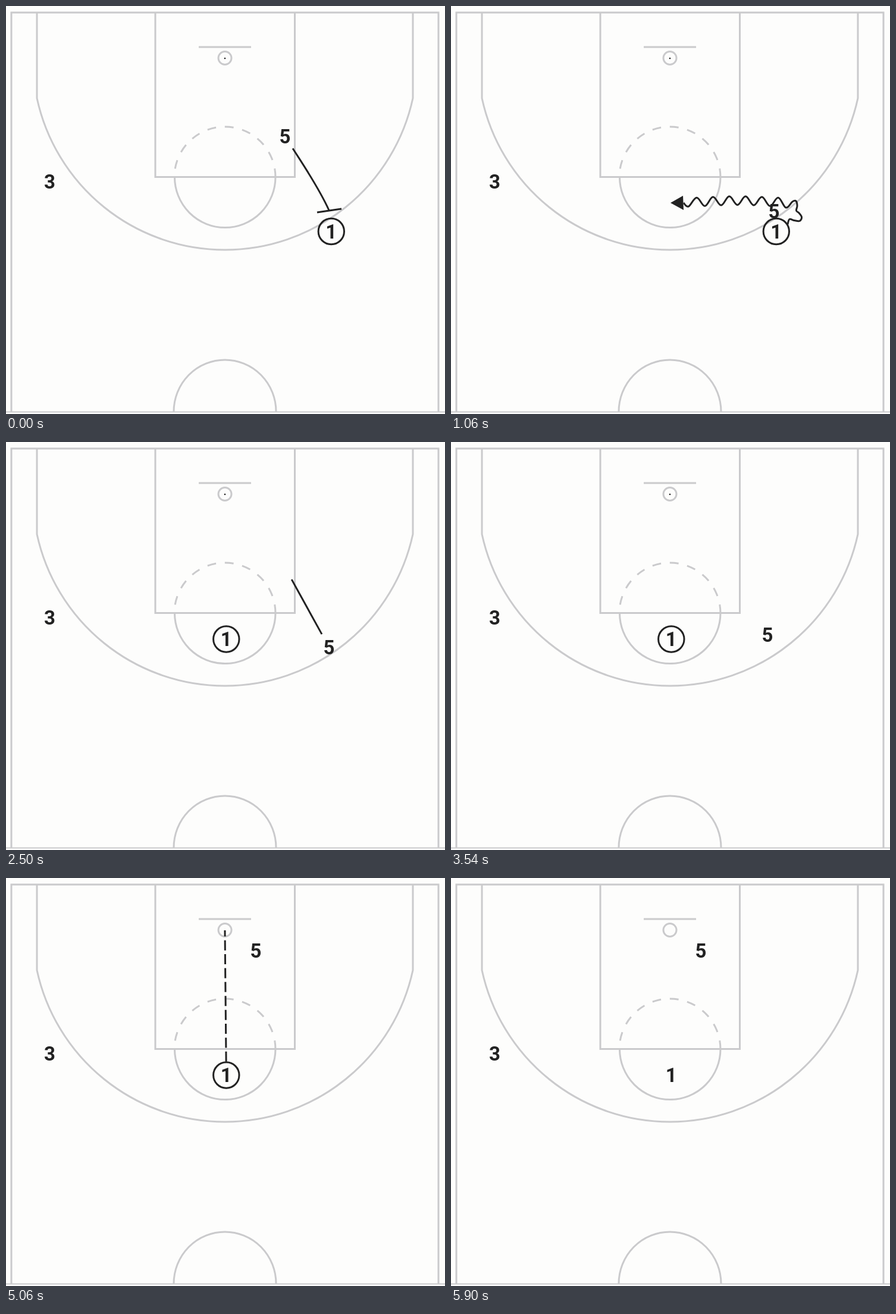
These frames come from a looping animation (738 px wide and 686 px high, 5.92 s). An HTML page:

```html
<!DOCTYPE html>
<html lang="en">
<head>
<meta charset="utf-8">
<title>Screen, dribble, cut, shot</title>
<style>
  html, body { margin: 0; width: 100%; height: 100%; overflow: hidden; background: #fdfdfc; }
  svg { display: block; width: 738px; height: 686px; }
  .court { fill: none; stroke: #cacacc; stroke-width: 3; }
  .ink { fill: none; stroke: #222; stroke-width: 3; }
  .solid { fill: #222; }
  text { font: 700 33px Roboto, Arial, sans-serif; text-anchor: middle; fill: #222; }
</style>
</head>
<body>
<svg viewBox="0 0 738 686">
  <g class="court">
    <path d="M9 682V11H727V682"/>
    <path d="M0 682.5H738" stroke-width="2"/>
    <path d="M52 11V155A323.3 323.3 0 0 0 684 155V11"/>
    <path d="M251 11V287.5H485.500V11"/>
    <path d="M283.500 287.500A84.700 85 0 0 0 453 287.500"/>
    <path d="M453 288A85 85 0 0 0 283 288" stroke-dasharray="14.830"/>
    <path d="M324 69H412"/>
    <circle cx="368" cy="87.5" r="11"/>
    <path d="M282 682A86 87 0 0 1 454 682"/>
  </g>
  <circle id="dot" class="solid" cx="368" cy="88" r="1.3"/>

  <g id="screen" class="ink">
    <path d="M482 239.500Q527 308 543 343.500M523 347L564 341"/>
  </g>
  <g id="dribble">
    <path id="wave" class="ink" pathLength="1"/>
    <path class="solid head" d="M369 331L390 319L391 343Z"/>
  </g>
  <g id="cut">
    <path id="cutLine" class="ink"/>
    <path class="solid head" d="M0 0L-22 -12V12Z" transform="translate(420 122) rotate(-118.900)"/>
  </g>
  <path id="shot" class="ink" stroke-dasharray="17 6.400"/>

  <path id="screenRoute" fill="none" d="M469 219Q518 290 543 345"/>
  <path id="dribbleRoute" fill="none" d="M546.800 379C563 366 582 358 582 345C582 329 560 329 536 328C480 326 430 326 370.300 331.500"/>

  <circle id="ball" class="ink" r="21.7"/>
  <text id="p1">1</text>
  <text id="p3">3</text>
  <text id="p5">5</text>
</svg>
<script>
const LOOP = 5920, MOVE = 320, DRAW = 235;
const moveAt = { screen: 20, dribble: 1769, cut: 3512, shot: 5280 };
const drawAt = { dribble: 550, cut: 2383, shot: 4110 };
const spots = { screen: [543, 345], rim: [420, 122], top: [370.3, 331.5], hoop: [368, 88] };

const $ = id => document.getElementById(id);
const clamp = v => Math.max(0, Math.min(1, v));
const mix = (a, b, p) => a.map((v, i) => v + (b[i] - v) * p);
const show = (el, on) => el.setAttribute('visibility', on ? 'visible' : 'hidden');
const moved = (name, t) => clamp((t - moveAt[name]) / MOVE);
const drawn = (name, t) => clamp((t - drawAt[name]) / DRAW);

function along(id, p) {
  const route = $(id), { x, y } = route.getPointAtLength(route.getTotalLength() * p);
  return [x, y];
}

function place(id, [x, y]) {
  $(id).setAttribute('x', x);
  $(id).setAttribute('y', y + 11.7);
}

function segment(id, a, b) {
  $(id).setAttribute('d', `M${a}L${b}`);
}

// Smooth curve through the given points.
function spline(pts) {
  let d = `M${pts[0]}`;
  for (let i = 0; i < pts.length - 1; i++) {
    const a = pts[i], b = pts[i + 1];
    const before = pts[i - 1] || a, after = pts[i + 2] || b;
    const c1 = a.map((v, k) => v + (b[k] - before[k]) / 5.5);
    const c2 = b.map((v, k) => v - (after[k] - a[k]) / 5.5);
    d += `C${c1} ${c2} ${b}`;
  }
  return d;
}

function wavePoints() {
  const pts = [[566, 367], [569, 358.5], [577, 360.5], [586, 361.5], [589.5, 355],
    [585, 348], [580.5, 344], [582, 336], [580, 328], [574, 329], [563, 339]];
  for (let k = 0; k < 12; k++) {
    const bow = 1.3 * Math.cos((k - 5) / 6 * Math.PI);
    pts.push([550 - 13.7 * k, 328.4 - bow + (k % 2 ? 7.3 : -7.3)]);
  }
  pts.push([391, 331]);
  return pts;
}

function render(t) {
  show($('screen'), t < moveAt.screen);

  const wave = drawn('dribble', t);
  show($('dribble'), wave > 0 && t < moveAt.dribble);
  $('wave').setAttribute('stroke-dasharray', `${wave} 2`);
  $('dribble').querySelector('.head').style.display = wave < 1 ? 'none' : '';

  const cut = drawn('cut', t);
  show($('cut'), cut > 0 && t < moveAt.cut);
  segment('cutLine', mix(spots.screen, spots.rim, 0.098), mix(spots.screen, spots.rim, 0.098 + 0.822 * cut));
  $('cut').querySelector('.head').style.display = cut < 1 ? 'none' : '';

  const shot = drawn('shot', t);
  show($('dot'), shot === 0);
  show($('shot'), shot > 0.093 && t < moveAt.shot);
  segment('shot', mix(spots.top, spots.hoop, 0.093), mix(spots.top, spots.hoop, Math.max(0.093, shot)));

  const one = along('dribbleRoute', moved('dribble', t));
  const five = t < moveAt.cut
    ? along('screenRoute', moved('screen', t))
    : mix(spots.screen, spots.rim, moved('cut', t));
  const flight = moved('shot', t);
  const [bx, by] = flight > 0 ? mix(spots.top, spots.hoop, flight) : one;
  place('p1', one);
  place('p5', five);
  $('ball').setAttribute('cx', bx);
  $('ball').setAttribute('cy', by);
  show($('ball'), flight < 1);
}

$('wave').setAttribute('d', spline(wavePoints()));
place('p3', [73.5, 295]);

const start = performance.now();
function tick() {
  render((performance.now() - start) % LOOP);
  requestAnimationFrame(tick);
}
render(0);
requestAnimationFrame(tick);
</script>
</body>
</html>
```
